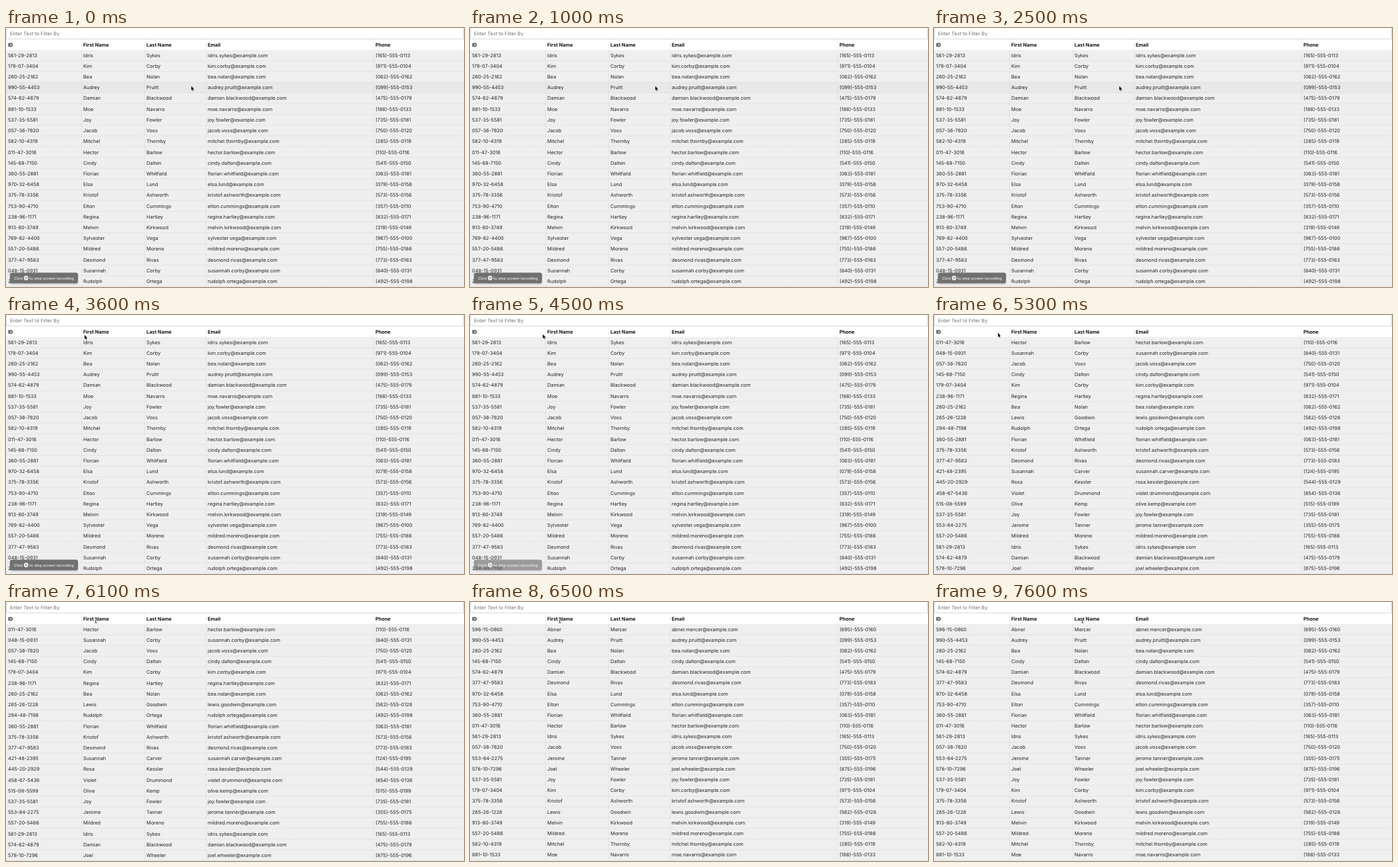
An HTML page for the animation above (8000 ms loop, 688 by 390 pixels).

```html
<!DOCTYPE html>
<html lang="en">
<head>
<meta charset="utf-8">
<title>Sortable contact table</title>
<style>
  html, body { margin: 0; width: 100%; height: 100%; overflow: hidden; background: #fff; }
  svg {
    display: block; width: 688px; height: 390px; fill: #242424;
    font: 7.35px Inter, "Liberation Sans", sans-serif; text-rendering: geometricPrecision;
  }
  .head { font-weight: 700; font-size: 7.3px; fill: #111; }
  .hint { fill: #707070; }
  .grid { stroke: #c3cad8; stroke-width: .6; stroke-dasharray: 1 1; fill: none; }
  .toast { font-size: 5.7px; font-weight: 500; fill: #f0f0f0; }

  .anim { animation: 8s step-end infinite; }
  #given { animation-name: given; }
  #byId { animation-name: byId; }
  #byFirst { animation-name: byFirst; }
  #hover { animation-name: hover; }
  #toast { animation-name: fade; }
  #pointer { animation-name: move; }
  #arrow { animation-name: arrow; }
  #beam { animation-name: beam; }

  /* sort clicks at 5.3 s and 6.5 s */
  @keyframes given { 0% { visibility: visible } 66.25%, 100% { visibility: hidden } }
  @keyframes byId { 0% { visibility: hidden } 66.25% { visibility: visible } 81.25%, 100% { visibility: hidden } }
  @keyframes byFirst { 0% { visibility: hidden } 81.25%, 100% { visibility: visible } }

  @keyframes hover {
    0% { transform: translateY(48.6px); opacity: 1 }
    37.5% { transform: translateY(32.4px); opacity: 1 }
    38.75% { transform: translateY(16.2px); opacity: 1 }
    40% { transform: none; opacity: 1 }
    41.25%, 100% { transform: none; opacity: 0 }
  }
  @keyframes fade {
    0% { opacity: 1 } 56.25% { opacity: .66 } 57.5% { opacity: .36 }
    58.75% { opacity: .12 } 60%, 100% { opacity: 0 }
  }
  @keyframes move {
    0% { transform: translate(278.3px, 87.5px) }
    37.5% { transform: translate(250px, 76px) }
    38.75% { transform: translate(196px, 55px) }
    40% { transform: translate(142px, 37px) }
    41.25% { transform: translate(118px, 30px) }
    56.25% { transform: translate(109.3px, 29px) }
    57.5% { transform: translate(102px, 28px) }
    58.75% { transform: translate(98px, 27.2px) }
    60% { transform: translate(96px, 26.8px) }
    73.75% { transform: translate(106px, 27px) }
    75% { transform: translate(126px, 28px) }
    76.25% { transform: translate(135px, 28px) }
    88.75% { transform: translate(140px, 28.5px) }
    90% { transform: translate(160px, 31px) }
    91.25% { transform: translate(185px, 32px) }
    92.5% { transform: translate(206px, 30px) }
    93.75% { transform: translate(219px, 28.3px) }
    95%, 100% { transform: translate(223px, 28px) }
  }
  @keyframes arrow {
    0% { visibility: visible } 75% { visibility: hidden }
    90% { visibility: visible } 93.75%, 100% { visibility: hidden }
  }
  @keyframes beam {
    0% { visibility: hidden } 75% { visibility: visible }
    90% { visibility: hidden } 93.75%, 100% { visibility: visible }
  }
</style>
</head>
<body>
<svg viewBox="0 0 688 390">
  <rect width="688" height="390" fill="#fff"/>
  <rect x=".5" y="-.5" width="687" height="17" rx="1.5" fill="#fff" stroke="#cfcfcf" stroke-width=".8"/>
  <text class="hint" x="6" y="10.7">Enter Text to Filter By</text>
  <rect y="33" width="688" height="357" fill="#efefef"/>
  <rect id="hover" class="anim" y="33" width="688" height="16.2" fill="#e8e8e8"/>
  <path id="lines" class="grid"/>
  <g id="head" class="head"></g>
  <g id="given" class="anim"></g>
  <g id="byId" class="anim"></g>
  <g id="byFirst" class="anim"></g>

  <g id="toast" class="anim toast">
    <rect x="5" y="368" width="104" height="18.5" rx="4" fill="#000" opacity=".12"/>
    <rect x="6" y="368.5" width="102" height="16" rx="3" fill="#707070"/>
    <text x="12" y="378.5">Click</text>
    <circle cx="30.2" cy="376.5" r="3.4"/>
    <path d="M28.9 375.2l2.6 2.6m0-2.6l-2.6 2.6" stroke="#666" stroke-width=".9"/>
    <text x="35.3" y="378.5">to stop screen recording</text>
  </g>

  <g id="pointer" class="anim">
    <path id="arrow" class="anim" d="M0 0V6.2L1.4 4.9 2.4 7.2 3.5 6.7 2.5 4.5H4.3Z"
      fill="#000" stroke="#fff" stroke-width=".6" paint-order="stroke"/>
    <g id="beam" class="anim" fill="none">
      <path id="bar" d="M-1.5-3.6Q0-3.6 0-2.7Q0-3.6 1.5-3.6M0-2.7V2.7M-1.5 3.6Q0 3.6 0 2.7Q0 3.6 1.5 3.6M-1 .9H1"/>
      <use href="#bar" stroke="#fff" stroke-width="1.7"/>
      <use href="#bar" stroke="#222" stroke-width=".8"/>
    </g>
  </g>
</svg>
<script>
const ROW = 16.2, TOP = 33, SHOWN = 22;
const columns = [3, 116, 211, 303, 555];
const people = `561-29-2813 Idris Sykes
179-07-3404 Kim Corby
260-25-2162 Bea Nolan
990-55-4453 Audrey Pruitt
574-62-4879 Damian Blackwood
881-10-1533 Moe Navarro
537-35-5581 Joy Fowler
057-38-7820 Jacob Voss
582-10-4319 Mitchel Thornby
011-47-3016 Hector Barlow
145-68-7150 Cindy Dalton
360-55-2881 Florian Whitfield
970-32-6458 Elsa Lund
375-78-3356 Kristof Ashworth
753-90-4710 Elton Cummings
238-96-1171 Regina Hartley
913-80-3749 Melvin Kirkwood
769-82-4400 Sylvester Vega
557-20-5486 Mildred Moreno
377-47-9583 Desmond Rivas
048-15-0931 Susannah Corby
294-48-7198 Rudolph Ortega
265-26-1228 Lewis Goodwin
421-48-2395 Susannah Carver
445-20-2929 Rosa Kessler
458-67-5436 Violet Drummond
515-08-5599 Olive Kemp
553-84-2275 Jerome Tanner
578-10-7296 Joel Wheeler
596-15-0860 Abner Mercer`.split("\n").map(line => {
  const [id, first, last] = line.split(" ");
  const mail = `${first}.${last}@example.com`.toLowerCase();
  const area = [...id.slice(0, 3)].reverse().join("");
  return [id, first, last, mail, `(${area})-555-01${id.slice(-2)}`];
});

const byId = id => document.getElementById(id);

function addRow(group, cells, y) {
  cells.forEach((cell, i) => {
    const text = document.createElementNS("http://www.w3.org/2000/svg", "text");
    text.setAttribute("x", columns[i]);
    text.setAttribute("y", y);
    text.textContent = cell;
    group.append(text);
  });
}

function fill(name, rows, pitch) {
  rows.slice(0, SHOWN).forEach((row, i) =>
    addRow(byId(name), row, Math.round(TOP + 10.62 + i * pitch)));
}

const sorted = col => [...people].sort((a, b) => a[col] < b[col] ? -1 : 1);

addRow(byId("head"), ["ID", "First Name", "Last Name", "Email", "Phone"], 27.6);
fill("given", people, 16.21);
fill("byId", sorted(0), 16.21);
fill("byFirst", sorted(1), 16.17);

let d = columns.slice(1).map(x => `M${x - 2.6} 17V390`).join("");
for (let i = 1; i <= SHOWN; i++) d += `M0 ${TOP + i * ROW}H688`;
byId("lines").setAttribute("d", d);
</script>
</body>
</html>
```
